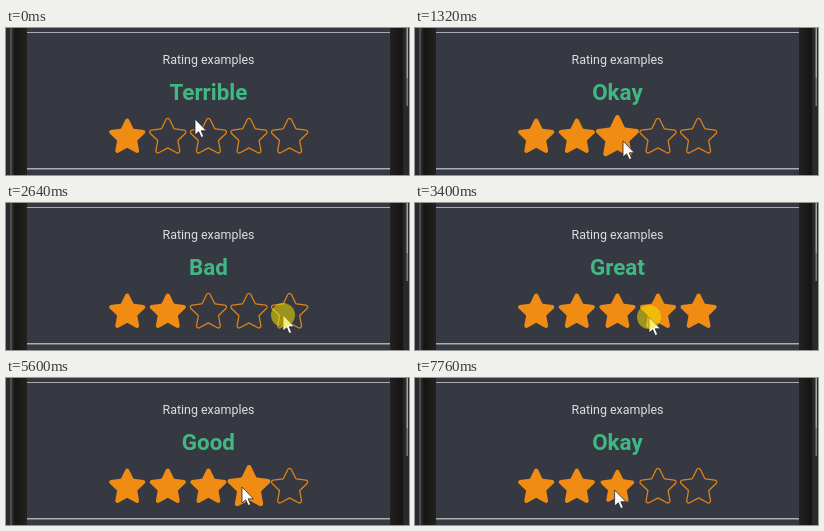
Animation of 403 by 147 pixels, one loop 7840 ms. Source, as an HTML page with a canvas:

```html
<!DOCTYPE html>
<html lang="en">
<head>
<meta charset="utf-8">
<title>Rating examples</title>
<style>
  html, body { margin: 0; width: 100%; height: 100%; overflow: hidden; background: #363941; }
  canvas, svg { position: absolute; left: 0; top: 0; width: 403px; height: 147px; }
  text { font-family: Roboto, sans-serif; text-anchor: middle; }
  .title { font-size: 12.45px; fill: #dedee0; }
  .label { font-size: 22.4px; font-weight: 700; fill: #41b883; }
</style>
</head>
<body>
<canvas id="stage"></canvas>
<svg viewBox="0 0 403 147">
  <text class="title" x="202.5" y="36">Rating examples</text>
  <text class="label" id="label" x="202.4" y="72.3">Terrible</text>
</svg>
<script>
const W = 403, H = 147, LOOP = 7840, STEP = 40;
const FIRST = 121.2, GAP = 40.6;
const ORANGE = '#f08c14';
const LABELS = ['Terrible', 'Bad', 'Okay', 'Good', 'Great'];

// Each tap: pointer arrives, finger lifts, place
const START = { x: 189, y: 91 };
const TAPS = [
  [200, 680, 158, 108], [1000, 1240, 208, 113], [1760, 2080, 159, 112],
  [2600, 2880, 277, 112], [3320, 3560, 234, 114], [4240, 5000, 124, 109],
  [5400, 5520, 236, 109], [6320, 6760, 160, 110], [7360, 7760, 199.6, 112]
].map(([arrive, lift, x, y]) => ({
  arrive, lift, x, y,
  press: Math.max(arrive, lift - 240),
  star: Math.round((x - FIRST) / GAP)
}));

const canvas = document.getElementById('stage');
const label = document.getElementById('label');
const ctx = canvas.getContext('2d');
const dpr = window.devicePixelRatio || 1;
canvas.width = W * dpr;
canvas.height = H * dpr;

const clamp = v => Math.max(0, Math.min(1, v));
const lerp = (a, b, k) => a + (b - a) * k;
const ease = k => k * k * (3 - 2 * k);

function box(x, y, w, h, color) {
  ctx.fillStyle = color;
  ctx.fillRect(x, y, w, h);
}

function bezel(x, outer, inner) {
  const g = ctx.createLinearGradient(outer, 0, inner, 0);
  g.addColorStop(0, '#303030');
  g.addColorStop(0.2, '#151514');
  g.addColorStop(1, '#242120');
  box(x, 0, 15, H, g);
}

function backdrop() {
  box(0, 0, W, H, '#363941');
  box(0, 0, 6, H, '#282a2e');
  box(4, 0, 2, H, '#4b4d51');
  box(399, 0, 4, H, '#282a2e');
  box(400.5, 0, 1.5, 50, '#a4a5a8');
  box(400.5, 50, 1.5, 28, '#77797d');
  bezel(6, 6, 21);
  bezel(384, 399, 384);
  box(21, 4, 363, 1, '#a9abb1');
  box(21, 140, 363, 1.5, '#acaeb4');
}

function starPath() {
  const corner = i => {
    const a = (i / 5 - 0.5) * Math.PI;
    const r = i % 2 ? 10.6 : 21.5;
    return [Math.cos(a) * r, Math.sin(a) * r];
  };
  const [tip, notch] = [corner(0), corner(9)];
  ctx.beginPath();
  ctx.moveTo((tip[0] + notch[0]) / 2, (tip[1] + notch[1]) / 2);
  for (let i = 0; i < 10; i++) {
    ctx.arcTo(...corner(i), ...corner(i + 1), i % 2 ? 0.8 : 2);
  }
  ctx.closePath();
}

function star(n, filled, scale) {
  ctx.save();
  ctx.translate(FIRST + n * GAP, 108);
  ctx.scale(scale, scale);
  ctx.translate(0, 1.3);
  starPath();
  if (filled) {
    ctx.fillStyle = ORANGE;
    ctx.fill();
  } else {
    ctx.strokeStyle = '#dc821a';
    ctx.lineWidth = 1.3;
    ctx.stroke();
  }
  ctx.restore();
}

// small at release, overshoots, then settles
function pop(age) {
  if (age < 80) return lerp(0.93, 1.19, age / 80);
  return lerp(1.19, 1, ease(clamp((age - 80) / 260)));
}

// longer trips take longer
function pointerAt(t) {
  let { x, y } = START;
  for (const tap of TAPS) {
    const trip = 100 + 2.2 * Math.abs(tap.x - x);
    const k = ease(clamp(1 + (t - tap.arrive) / trip));
    if (k === 0) break;
    x = lerp(x, tap.x, k);
    y = lerp(y, tap.y, k);
  }
  return [x, y];
}

function pointer(x, y) {
  ctx.save();
  ctx.translate(x, y);
  ctx.beginPath();
  ctx.moveTo(0, 0);
  ctx.lineTo(0, 16);
  ctx.lineTo(3.7, 12.7);
  ctx.lineTo(6.2, 18.5);
  ctx.lineTo(8.7, 17.5);
  ctx.lineTo(6.2, 11.8);
  ctx.lineTo(11.4, 11.8);
  ctx.closePath();
  ctx.fillStyle = '#fff';
  ctx.fill();
  ctx.strokeStyle = '#25252a';
  ctx.lineWidth = 0.8;
  ctx.stroke();
  ctx.restore();
}

function touch(x, y) {
  ctx.beginPath();
  ctx.arc(x, y, 12, 0, Math.PI * 2);
  ctx.fillStyle = 'rgba(240, 225, 0, 0.55)';
  ctx.fill();
}

function draw(t) {
  const last = TAPS.filter(tap => tap.lift <= t).pop() || { star: 0, lift: -LOOP };
  const pressed = TAPS.some(tap => t >= tap.press && t < tap.lift);
  const [x, y] = pointerAt(t);

  ctx.setTransform(dpr, 0, 0, dpr, 0, 0);
  backdrop();
  for (let n = 0; n < 5; n++) {
    star(n, n <= last.star, n === last.star ? pop(t - last.lift) : 1);
  }
  pointer(x, y);
  if (pressed) touch(x, y);
  if (label.textContent !== LABELS[last.star]) label.textContent = LABELS[last.star];
}

const begin = performance.now();
function tick() {
  const t = (performance.now() - begin) % LOOP;
  draw(Math.floor(t / STEP) * STEP);
  requestAnimationFrame(tick);
}
draw(0);
requestAnimationFrame(tick);
</script>
</body>
</html>
```
